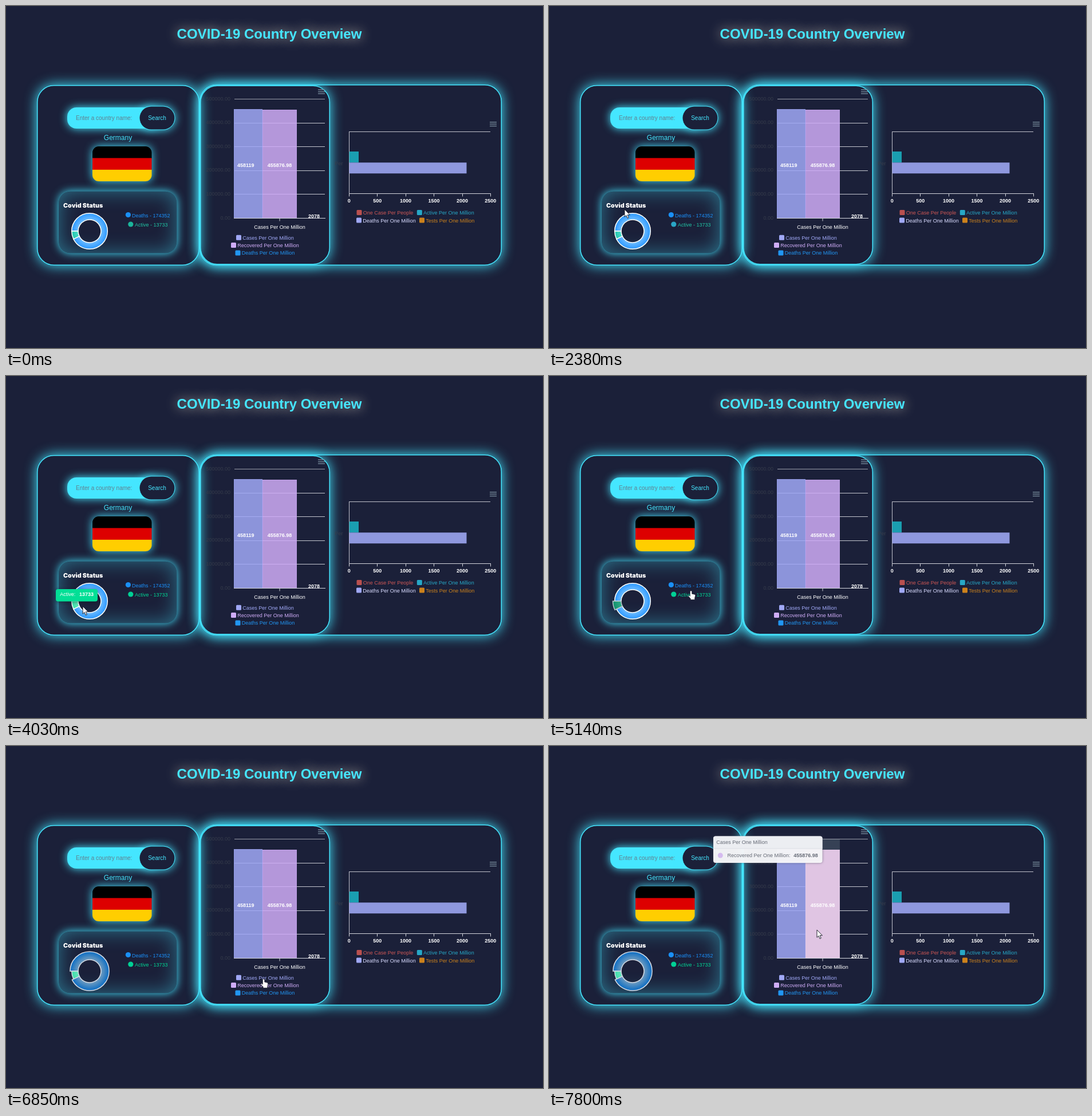
Animation, 938 px wide and 597 px high, one loop 8000 ms. Source, as an HTML page with a canvas:

```html
<!DOCTYPE html>
<html lang="en">
<head>
<meta charset="utf-8">
<title>Country Overview</title>
<style>
html, body { margin: 0; width: 100%; height: 100%; overflow: hidden; background: #1b2039; }
canvas { display: block; width: 938px; height: 597px; }
</style>
</head>
<body>
<canvas id="stage" width="938" height="597"></canvas>
<script>
const LOOP = 8000, W = 938, H = 597;
const BG = '#1b2039', CYAN = '#45e6ff', DIM = '#363c4b';
const SANS = '"Liberation Sans", Arial, sans-serif';
const view = document.getElementById('stage').getContext('2d');
const backdrop = document.createElement('canvas');
backdrop.width = W;
backdrop.height = H;
let ctx = backdrop.getContext('2d');

const clamp = v => Math.max(0, Math.min(1, v));
const mix = (a, b, k) => a + (b - a) * k;

function text(str, x, y, color, size = 9, weight = 'normal', align = 'left', family = SANS) {
  ctx.font = `${weight} ${size}px ${family}`;
  ctx.textAlign = align;
  ctx.fillStyle = color;
  ctx.fillText(str, x, y);
}

function rect(x, y, w, h, color) {
  ctx.fillStyle = color;
  ctx.fillRect(x, y, w, h);
}

function roundPath(x, y, w, h, r) {
  ctx.beginPath();
  ctx.roundRect(x, y, w, h, r);
}

function pill(x, y, w, h, r, color) {
  roundPath(x, y, w, h, r);
  ctx.fillStyle = color;
  ctx.fill();
}

function disc(x, y, r, color) {
  ctx.beginPath();
  ctx.arc(x, y, r, 0, Math.PI * 2);
  ctx.fillStyle = color;
  ctx.fill();
}

// Glow outside a rounded box only, like a CSS box-shadow
function glow(x, y, w, h, r, blur) {
  ctx.save();
  ctx.beginPath();
  ctx.rect(0, 0, W, H);
  ctx.roundRect(x, y, w, h, r);
  ctx.clip('evenodd');
  ctx.shadowColor = CYAN;
  ctx.shadowBlur = blur;
  pill(x, y, w, h, r, CYAN);
  ctx.restore();
}

function innerGlow(x, y, w, h, r, blur, alpha) {
  ctx.save();
  roundPath(x, y, w, h, r);
  ctx.clip();
  ctx.globalAlpha = alpha;
  ctx.shadowColor = CYAN;
  ctx.shadowBlur = blur;
  ctx.beginPath();
  ctx.rect(x - 60, y - 60, w + 120, h + 120);
  ctx.roundRect(x, y, w, h, r);
  ctx.fillStyle = CYAN;
  ctx.fill('evenodd');
  ctx.restore();
}

function panel(x, y, w, h) {
  glow(x, y, w, h, 30, 22);
  roundPath(x + 0.75, y + 0.75, w - 1.5, h - 1.5, 29);
  ctx.strokeStyle = CYAN;
  ctx.lineWidth = 1.5;
  ctx.stroke();
}

function menuIcon(x, y) {
  for (let i = 0; i < 3; i++) rect(x, y + i * 3.4, 12, 1.5, '#6e8192');
}

function legendItem(x, y, label, marker, color = marker) {
  pill(x, y - 8, 9, 9, 1.5, marker);
  text(label, x + 11.3, y, color);
}

function drawBackdrop() {
  rect(0, 0, W, H, BG);
  ctx.save();
  ctx.shadowColor = 'rgba(255,240,215,.8)';
  ctx.shadowBlur = 20;
  text('COVID-19 Country Overview', 460, 57, CYAN, 24, 'bold', 'center');
  ctx.restore();

  panel(54, 138, 284, 315);
  panel(338, 137, 528, 316);
  panel(339, 138.5, 227, 313);

  glow(107, 177, 160, 37, 16, 15);
  pill(107, 177, 160, 37, 16, CYAN);
  text('Enter a country name:', 122, 198.5, '#627f8e', 10);
  glow(232.5, 174.5, 63, 42, 21, 15);
  pill(232.5, 174.5, 63, 42, 21, CYAN);
  pill(233.5, 175.5, 61, 40, 20, BG);
  text('Search', 264, 198.5, CYAN, 10, 'normal', 'center');

  text('Germany', 195.5, 234, CYAN, 12, 'normal', 'center');
  glow(151, 245, 103.5, 61, 11, 15);
  ctx.save();
  roundPath(151, 245, 103.5, 61, 11);
  ctx.clip();
  ['#000', '#dd0000', '#ffce00'].forEach((c, i) => rect(151, 245 + i * 20.4, 104, 21, c));
  ctx.restore();

  glow(92, 323.5, 206.5, 108, 20, 15);
  pill(92, 323.5, 206.5, 108, 20, BG);
  innerGlow(92, 323.5, 206.5, 108, 20, 34, 0.42);
  text('Covid Status', 100, 351.5, '#fff', 10.8, 900, 'left', 'Inter, sans-serif');
  disc(213.4, 364.5, 4.6, '#1a90f7');
  text('Deaths - 174352', 220, 368.5, '#1a90fb');

  menuIcon(545, 145.5);
  for (let i = 0; i < 6; i++) {
    text((5 - i) * 100000 ? `${(5 - i) * 100000}.00` : '0.00', 392, 164.5 + i * 41.6, DIM, 9, 'normal', 'right');
    rect(399, 162 + Math.round(i * 41.6), 158, 1, i ? '#c4c6cf' : '#9a9da9');
  }
  rect(477.5, 371, 1, 4.5, '#c8cad2');
  text('Cases Per One Million', 478, 388.5, '#fff', 9, 'normal', 'center');
  legendItem(402, 407.7, 'Cases Per One Million', '#a0a8f7');
  legendItem(393, 421, 'Recovered Per One Million', '#cfacf7');
  legendItem(400.5, 434.4, 'Deaths Per One Million', '#2196f3');

  menuIcon(845, 202);
  rect(599, 219, 247, 1, '#c0c2cb');
  rect(599, 327, 248, 1, '#d4d6dd');
  rect(599, 219, 1, 109, '#c0c2cb');
  for (let i = 0; i < 6; i++) {
    const x = 599 + i * 49.4;
    rect(Math.round(x), 328, 1, 4.5, '#d4d6dd');
    text(String(i * 500), x + 0.3, 343, '#fff', 9, 'bold', 'center');
  }
  rect(599.5, 254, 16.5, 19.3, '#1a9eb0');
  rect(599.5, 273.3, 205, 19, '#8f98de');
  text('Per', 588.5, 278, DIM, 9, 'normal', 'right');
  legendItem(612.5, 364, 'One Case Per People', '#b9504f', '#cc5655');
  legendItem(717.8, 364, 'Active Per One Million', '#27a7c6');
  legendItem(612, 377.5, 'Deaths Per One Million', '#a0a8f7', '#d9dbff');
  legendItem(722, 377.5, 'Tests Per One Million', '#cb811c');
}

function slice(from, to, r, inner, outer, stroke) {
  const cx = 146, cy = 393, hole = 20;
  const fill = ctx.createRadialGradient(cx, cy, hole, cx, cy, r);
  fill.addColorStop(0, inner);
  fill.addColorStop(1, outer);
  ctx.beginPath();
  ctx.arc(cx, cy, r, from, to);
  ctx.arc(cx, cy, hole, to, from, true);
  ctx.closePath();
  ctx.fillStyle = fill;
  ctx.fill();
  ctx.strokeStyle = stroke;
  ctx.lineWidth = 1.5;
  ctx.stroke();
}

function drawDonut(t) {
  const split = Math.PI * (1 + 2 * 174352 / (174352 + 13733));
  const overActive = clamp((t - 4880) / 150) * (t < 5660);
  const overDeaths = clamp((t - 5660) / 60);
  const hoverBlue = t > 2650 && t < 3560;
  const hoverGreen = t >= 3560 && t < 4250;

  let blue = ['#6dbcff', '#2b98ff'];
  if (hoverBlue) blue = ['#8ccaff', '#56afff'];
  if (overDeaths) blue = ['#6f9cc0', '#0a6cc4'];
  let green = t < 2650 ? ['#4bdcc8', '#22c6ae'] : ['#4be0b2', '#16d69a'];
  if (hoverGreen) green = ['#66e8bd', '#38e2a8'];
  if (overActive) green = ['#2fae86', '#128f6c'];
  if (overDeaths) green = ['#66e4bb', '#3fdfaa'];

  const edge = overDeaths ? '#d3dae4' : '#fff';
  slice(Math.PI, split, 31.3 + 2.8 * overDeaths, ...blue, edge);
  slice(split, Math.PI * 3, 31.3 + 3.2 * overActive, ...green, overActive ? '#b9c6cd' : edge);

  let marker = '#00d195';
  if (t < 190) marker = '#1bb59b';
  else if (t < 2650) marker = '#2aa6c6';
  disc(217.8, 381, 4.6, marker);
  text('Active - 13733', 225, 385, t < 2650 ? '#20c4a4' : '#00d694');
}

function drawBars(t) {
  const hot = t < 7060 ? -1 : t < 7660 ? 0 : 1;
  if (hot >= 0) rect(448, 163, 60, 207, '#364155');
  const bars = [
    [398, 180, 50, '160,168,247', '182,194,228'],
    [448, 181, 60, '207,172,247', '230,202,232']
  ];
  bars.forEach(([x, y, w, base, light], i) => {
    const color = hot === i ? `rgba(${light},.97)` : `rgba(${base},.85)`;
    rect(x, y, w, 370 - y, color);
    ctx.strokeStyle = `rgba(${hot === i ? light : base},.5)`;
    ctx.lineWidth = 0.75;
    ctx.strokeRect(x + 0.4, y + 0.4, w - 0.8, 370 - y);
  });
  rect(398, 370, 160, 1, '#d4d6dd');
  text('458119', 418.7, 280.5, '#fff', 9, 'bold', 'center');
  text('455876.98', 478, 280.5, '#fff', 9, 'bold', 'center');
  text('2078', 538, 370, '#fff', 9, 'bold', 'center');
}

function pieTip(t, y) {
  if (t < 2680 || t > 4250) return;
  const active = t >= 3560;
  const top = y - 30, w = active ? 73 : 83;
  ctx.save();
  ctx.shadowColor = 'rgba(10,15,30,.5)';
  ctx.shadowBlur = 6;
  ctx.shadowOffsetY = 1;
  pill(87, top, w, 21.5, 4, active ? '#03df96' : '#0f8ffb');
  ctx.restore();
  text(active ? 'Active:' : 'Deaths:', 94.3, top + 12.3, '#fff');
  text(active ? '13733' : '174352', 80 + w, top + 12.3, '#fff', 9, 'bold', 'right');
}

function barTip(t) {
  if (t < 7060) return;
  const second = t >= 7660;
  const w = second ? 190.5 : 172;
  ctx.save();
  ctx.globalAlpha = mix(0, 0.87, clamp((t - 7060) / 130)) + 0.08 * clamp((t - 7200) / 100);
  ctx.shadowColor = 'rgba(60,65,80,.6)';
  ctx.shadowBlur = 4;
  pill(287, 157.5, w, 46.5, 4, '#fafafc');
  ctx.shadowColor = 'transparent';
  pill(287, 157.5, w, 21.5, [4, 4, 0, 0], '#eceff3');
  rect(287, 178.5, w, 0.8, '#d6d9df');
  text('Cases Per One Million', 292.3, 171, '#5f6470');
  disc(299.3, 191, 4.5, second ? '#d3b7ee' : '#a9b3ec');
  text(second ? 'Recovered Per One Million:' : 'Cases Per One Million:', 311.5, 194, '#5f6470');
  text(second ? '455876.98' : '458119.00', 279.3 + w, 194, '#5f6470', 9, 'bold', 'right');
  ctx.restore();
}

// Pointer path: time, x, y
const PATH = [
  [190, 200, 590], [450, 186, 400], [800, 142, 225], [930, 131, 186], [1000, 135, 203],
  [1450, 181, 203], [1600, 178, 222], [1830, 188, 258], [1980, 188, 275], [2380, 132, 355],
  [2660, 132, 369], [3010, 133, 381], [3340, 133, 381], [3680, 134, 402], [4030, 134, 402],
  [4500, 182, 397], [4870, 244, 378], [5140, 248, 375], [5550, 248, 374], [5680, 248, 366],
  [5950, 248, 366], [6710, 394, 401], [6850, 450, 407], [7050, 442, 367], [7200, 428, 320],
  [7530, 432, 321], [7800, 468, 321], [LOOP, 468, 321]
];

function pointerAt(t) {
  let i = 1;
  while (i < PATH.length - 1 && PATH[i][0] < t) i++;
  const [t0, x0, y0] = PATH[i - 1], [t1, x1, y1] = PATH[i];
  const k = clamp((t - t0) / (t1 - t0));
  return [mix(x0, x1, k), mix(y0, y1, k)];
}

const ARROW = new Path2D('M0 0V13.2L3 10.5L5 15.4L7.2 14.5L5.2 9.7H9.4Z');
const HAND = new Path2D('M0 0C1.2 0 1.7 .7 1.7 1.7V5.2L6.3 6.3Q7.8 6.8 7.6 8.6L6.6 12.6V15.5H-.8V13.6L-4.4 9.6Q-4.8 8.2 -3.4 8L-1.6 9.4V1.7C-1.6 .7 -1.2 0 0 0Z');
const BEAM = new Path2D('M-2.5 -6H-.6L0 -5.4L.6 -6H2.5M0 -5.4V5.4M-2.5 6H-.6L0 5.4L.6 6H2.5');

function drawPointer(x, y) {
  const within = (l, t, r, b) => x >= l && x <= r && y >= t && y <= b;
  const hand = within(207, 358, 288, 387) || within(400, 398, 513, 436) || within(233, 175, 295, 216);
  ctx.save();
  ctx.translate(x, y);
  ctx.lineWidth = 1;
  if (within(107, 177, 232, 214)) {
    ctx.strokeStyle = '#26566a';
    ctx.stroke(BEAM);
  } else {
    const shape = hand ? HAND : ARROW;
    ctx.fillStyle = '#fff';
    ctx.fill(shape);
    ctx.strokeStyle = '#10131f';
    ctx.lineWidth = hand ? 0.6 : 0.9;
    ctx.stroke(shape);
  }
  ctx.restore();
}

function frame(now) {
  const t = now % LOOP;
  const [x, y] = pointerAt(t);
  ctx.drawImage(backdrop, 0, 0);
  drawDonut(t);
  drawBars(t);
  pieTip(t, y);
  barTip(t);
  if (t >= 190) drawPointer(x, y);
  requestAnimationFrame(frame);
}

drawBackdrop();
ctx = view;
const start = performance.now();
requestAnimationFrame(now => frame(Math.max(0, now - start)));
</script>
</body>
</html>
```
